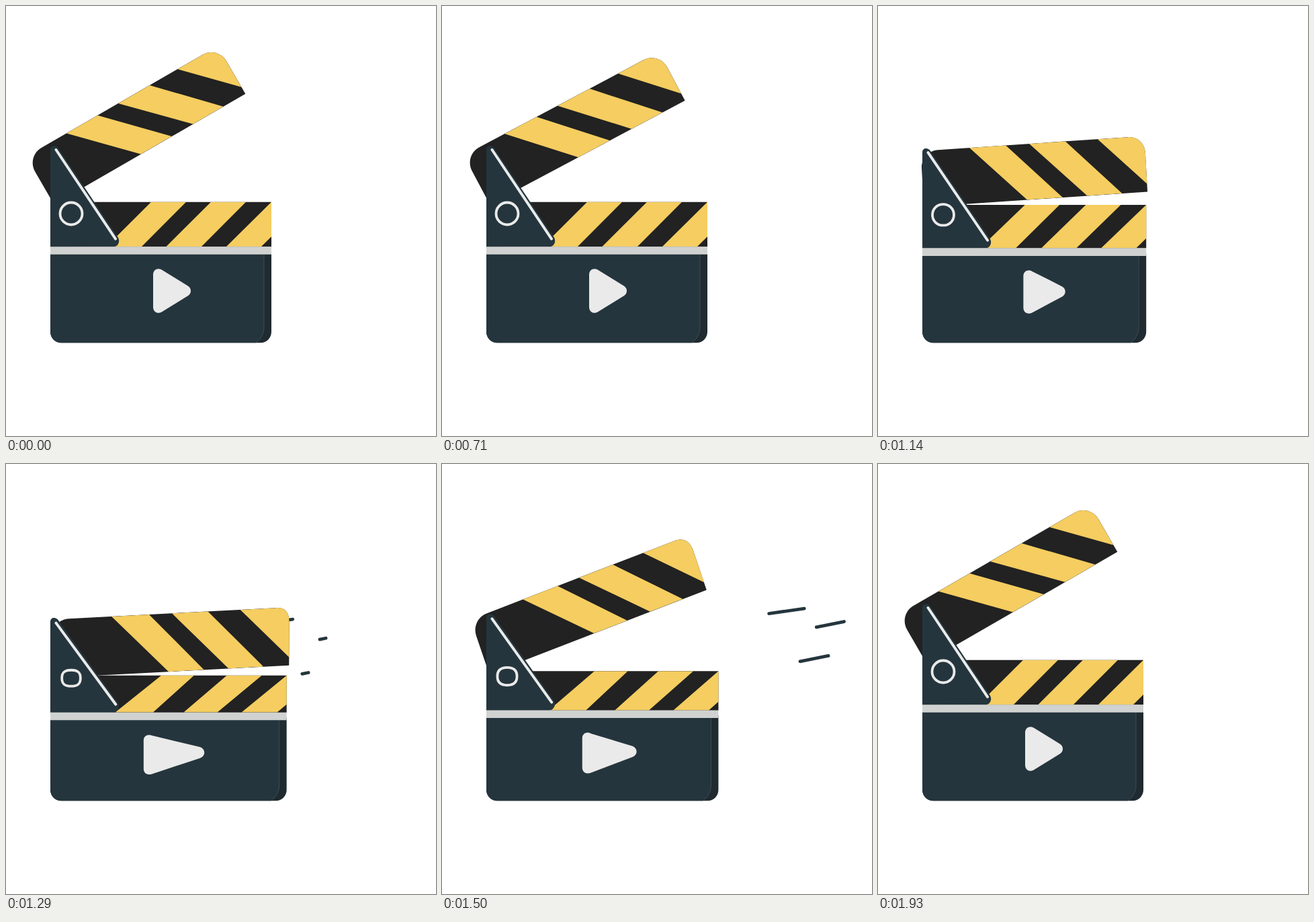
These frames come from a looping animation (640 by 640 pixels, 2430 ms). An HTML page:

```html
<!DOCTYPE html>
<html lang="en">
<head>
<meta charset="utf-8">
<title>Clapperboard</title>
<style>
  html, body { margin: 0; width: 100%; height: 100%; overflow: hidden; background: #fff; }
  svg { display: block; width: 100%; height: 100%; }
  .navy { fill: #25353d; }
  .black { fill: #222; }
  .yellow { fill: #f5cd60; }
  .pale { fill: #eaeaea; }
  .edge { fill: none; stroke: #eaeaea; stroke-width: 4; stroke-linecap: round; }
  .spark { stroke: #25353d; stroke-width: 4.8; stroke-linecap: round; }
</style>
</head>
<body>
<svg viewBox="0 0 640 640">
  <defs>
    <clipPath id="armClip"><path data-shape="arm"/></clipPath>
    <clipPath id="barClip"><path data-shape="bar"/></clipPath>
  </defs>
  <g id="sparks"></g>
  <g id="arm">
    <path class="black" data-shape="arm"/>
    <g clip-path="url(#armClip)"><path class="yellow" data-shape="armStripes"/></g>
  </g>
  <path class="black" data-shape="bar"/>
  <g clip-path="url(#barClip)"><path class="yellow" data-shape="barStripes"/></g>
  <path fill="#1f2b31" data-shape="back"/>
  <path class="navy" data-shape="front"/>
  <path fill="none" stroke="#66757c" stroke-width=".5" stroke-opacity=".8" data-shape="seam"/>
  <path class="navy" data-shape="hinge"/>
  <path fill="#d0d2d1" data-shape="rail"/>
  <path class="edge" data-shape="hingeEdge"/>
  <path class="edge" style="stroke-width:3.8" data-shape="ring"/>
  <path class="pale" data-shape="play"/>
</svg>
<script>
const FPS = 14, FRAMES = 34, LOOP = 2430;

// The ring keeps its handle length while its radii shrink.
function ringPath(cy, rx, ry) {
  const cx = 97, h = 9.1, l = cx - rx, r = cx + rx, t = cy - ry, b = cy + ry;
  return `M${l} ${cy}C${l} ${cy - h} ${cx - h} ${t} ${cx} ${t}` +
    `C${cx + h} ${t} ${r} ${cy - h} ${r} ${cy}` +
    `C${r} ${cy + h} ${cx + h} ${b} ${cx} ${b}` +
    `C${cx - h} ${b} ${l} ${cy + h} ${l} ${cy}Z`;
}

// Each shape: relaxed path, squashed path.
const shapes = {
  arm: [
    'M0 0L0 -56.4C0 -70.8 11.6 -82.4 26 -82.4L303 -82.4C317.4 -82.4 329 -70.8 329 -56.4L329 0Z',
    'M0 0L3.5 -60.8C4 -75.2 15.6 -86.8 30 -86.8L340 -86.8C354.4 -86.8 359 -80.4 359 -66L355 0Z'],
  armStripes: [
    'M69 -82.4L122.5 -82.4L202.6 0L149.5 0ZM158 -82.4L212 -82.4L291.3 0L239.3 0ZM260 -82.4L380 -82.4L380 0L340.6 0Z',
    'M95 -86.8L151 -86.8L228.4 0L175.6 0ZM185 -86.8L238.6 -86.8L317 0L264.9 0ZM287 -86.8L406 -86.8L406 0L367 0Z'],
  bar: ['M66 291.7H395V358.5H66Z', 'M66 316H419V370.8H66Z'],
  barStripes: [
    'M216 291.7L268 291.7L202 358L149.5 358ZM305 291.7L357 291.7L291 358L238.5 358ZM395 291.7L447 291.7L380 358L328 358Z',
    'M232 316L280.5 316L220 370.3L163.5 370.3ZM330 316L382 316L316 370.3L266 370.3ZM419 316L470 316L405 370.3L352 370.3Z'],
  back: [
    'M66 366H395V485C395 494 388 501.3 379 501.3H82C73 501.3 66 494 66 485Z',
    'M66 378H419V485C419 494 412 501.3 403 501.3H82C73 501.3 66 494 66 485Z'],
  front: [
    'M66 366H384V478C384 488 379 496 372 501.3H82C73 501.3 66 494 66 485Z',
    'M66 378H408V478C408 488 403 496 396 501.3H82C73 501.3 66 494 66 485Z'],
  seam: [
    'M384 370V478C384 488 379 496 372 501',
    'M408 382V478C408 488 403 496 396 501'],
  rail: ['M66 358.2H395V369.8H66Z', 'M66 370.4H419V381.8H66Z'],
  hinge: [
    'M66 359V214C66 207 74.5 206.5 78 212L166.5 344C170.5 350 167 358.4 160 358.4Z',
    'M66 371V236C66 229 74.5 228.5 78 234L166.5 356C170 361 167 370.6 158 370.6Z'],
  hingeEdge: ['M74.5 214L163 346.7', 'M74.5 238L163.3 358.4'],
  ring: [ringPath(309, 16.5, 16.5), ringPath(319.3, 13.7, 11.7)],
  play: [
    'M219 400C219 392.5 226 389 232 392.8L270.5 416.5C276.5 420 276.5 428 270.5 431.5L232 455.3C226 459 219 455.5 219 448Z',
    'M204 412C204 405 210.5 402 217 405L290 421.5C298.5 424.5 298.5 435 290 438L217 461.5C210.5 464 204 461 204 454Z']
};

// Arm angle: [step, degrees]
const swing = [[5, 30], [10, 28], [13, 22], [14, 19.9], [15, 14.5], [16, 3.85],
  [17, 0], [18, 3], [19, 10.5], [20, 17.4], [23, 26.5], [27, 30]];

// Flying dashes: start, end, and the steps during which the tail travels.
const sparks = [
  { from: [412, 233.3], to: [554, 213], tail: [17.2, 24.55] },
  { from: [460, 262.5], to: [614.5, 231.3], tail: [17.16, 23.7] },
  { from: [433.7, 313.8], to: [591.5, 282.1], tail: [17.16, 23.7] }
];

const lerp = (a, b, k) => a + (b - a) * k;

function smooth(a, b, x) {
  const t = Math.min(1, Math.max(0, (x - a) / (b - a)));
  return t * t * (3 - 2 * t);
}

function morph([a, b], k) {
  const num = /-?\d+(\.\d+)?/g, goal = b.match(num);
  let i = 0;
  return a.replace(num, n => lerp(+n, +goal[i++], k).toFixed(2));
}

// Cubic curve through the keys, flat at both ends.
function curve(keys, x) {
  const last = keys.length - 1;
  if (x <= keys[0][0]) return keys[0][1];
  if (x >= keys[last][0]) return keys[last][1];
  const i = keys.findIndex(key => key[0] > x) - 1;
  const slope = j => j <= 0 || j >= last ? 0 :
    (keys[j + 1][1] - keys[j - 1][1]) / (keys[j + 1][0] - keys[j - 1][0]);
  const [x0, y0] = keys[i], [x1, y1] = keys[i + 1];
  const d = x1 - x0, t = (x - x0) / d, s = t * t * (3 - 2 * t);
  return lerp(y0, y1, s) + d * t * (1 - t) * ((1 - t) * slope(i) - t * slope(i + 1));
}

const targets = [...document.querySelectorAll('[data-shape]')];
const arm = document.getElementById('arm');
const sparkLayer = document.getElementById('sparks');
for (const spark of sparks) {
  spark.el = document.createElementNS('http://www.w3.org/2000/svg', 'line');
  spark.el.setAttribute('class', 'spark');
  sparkLayer.append(spark.el);
}

function drawSpark({ el, from, to, tail }, step) {
  const a = smooth(...tail, step), b = smooth(17, 22, step);
  el.style.display = b > a && a < 1 ? '' : 'none';
  el.setAttribute('x1', lerp(from[0], to[0], a));
  el.setAttribute('y1', lerp(from[1], to[1], a));
  el.setAttribute('x2', lerp(from[0], to[0], b));
  el.setAttribute('y2', lerp(from[1], to[1], b));
}

function draw(step) {
  const squash = 1.12 * (smooth(15, 19, step) - smooth(19, 23.7, step));
  for (const el of targets) el.setAttribute('d', morph(shapes[el.dataset.shape], squash));
  const angle = curve(swing, step);
  arm.setAttribute('transform',
    `translate(71.6 ${288.2 + 25.2 * squash}) rotate(${-angle}) translate(-3.74 6.07)`);
  for (const spark of sparks) drawSpark(spark, step);
}

// Motion advances in steps that start on whole hundredths of a second.
const stepStart = i => Math.round(i * 100 / FPS) * 10;

function stepAt(ms) {
  let i = Math.min(FRAMES - 1, Math.floor(ms * FPS / 1000) + 1);
  while (i > 0 && stepStart(i) > ms) i--;
  return i;
}

let origin = null, shown = -1;
function tick(now) {
  if (origin === null) origin = now;
  const step = stepAt((now - origin) % LOOP);
  if (step !== shown) draw(shown = step);
  requestAnimationFrame(tick);
}
draw(0);
requestAnimationFrame(tick);
</script>
</body>
</html>
```
